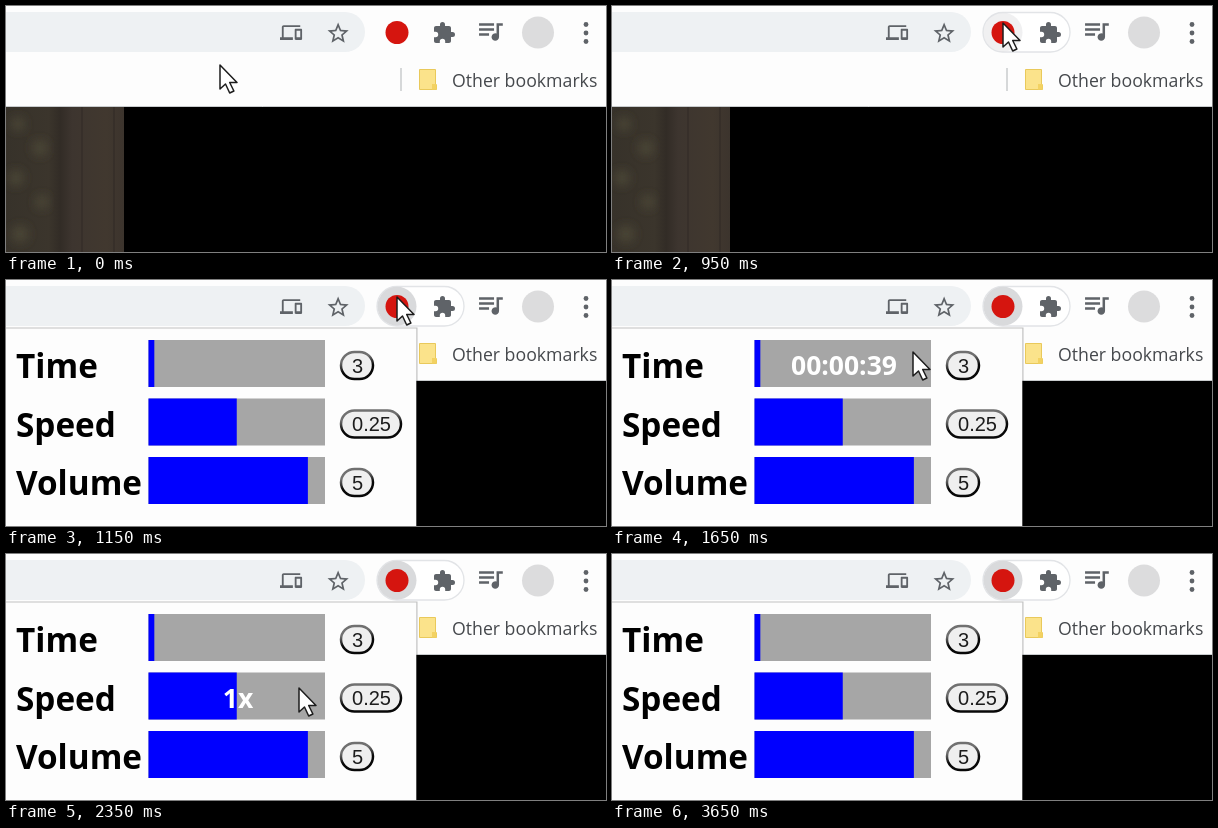
An HTML page for the animation above (3700 ms loop, 600 by 246 pixels).

```html
<!DOCTYPE html>
<html lang="en">
<head>
<meta charset="utf-8">
<title>Player controls popup</title>
<style>
  html, body { margin: 0; width: 100%; height: 100%; overflow: hidden; background: #fdfdfd; }
  svg { display: block; width: 600px; height: 246px; }
  .icon { fill: #5f6368; }
  .name { font: 700 33.3px "Open Sans", "Noto Sans", sans-serif; fill: #000; }
  .value { font: 700 26.5px "Open Sans", "Noto Sans", sans-serif; fill: #fff; text-anchor: middle; }
  .step { font: 20px "Liberation Sans", Arial, sans-serif; fill: #1c1c1c; text-anchor: middle; }
  .bookmark { font: 17.7px "Open Sans", "Noto Sans", sans-serif; fill: #46494d; }
</style>
</head>
<body>
<svg viewBox="0 0 600 246">
  <defs>
    <linearGradient id="bevel" x1="0" y1="0" x2=".3" y2="1">
      <stop offset=".35" stop-color="#707070"/><stop offset=".7" stop-color="#080808"/>
    </linearGradient>
    <linearGradient id="wall">
      <stop offset="0" stop-color="#37322a"/><stop offset=".36" stop-color="#3b352c"/>
      <stop offset=".46" stop-color="#322c26"/><stop offset=".56" stop-color="#3d352f"/>
      <stop offset=".85" stop-color="#41382f"/><stop offset="1" stop-color="#3c342d"/>
    </linearGradient>
    <filter id="soft"><feGaussianBlur stdDeviation="5"/></filter>
    <clipPath id="photo"><path d="M0 101h118v145H0z"/></clipPath>
  </defs>

  <path fill="#fdfdfd" d="M0 0h600v246H0z"/>
  <path fill="#eef1f3" d="M0 6h339a20 20 0 0 1 0 40H0z"/>

  <g id="pill" visibility="hidden">
    <rect x="371" y="6.5" width="87" height="39.5" rx="19.7" fill="#fff" stroke="#e2e4e7" stroke-width="1.3"/>
    <circle id="hover" cx="391" cy="26.3" r="19.5" fill="#d9dadc"/>
  </g>
  <circle cx="391" cy="26.5" r="11.5" fill="#d5150f"/>

  <g class="icon">
    <path transform="translate(274 15.5) scale(.92)" d="M4 6h18V4H4c-1.1 0-2 .9-2 2v11H0v3h14v-3H4V6zm19 2h-6c-.55 0-1 .45-1 1v10c0 .55.45 1 1 1h6c.55 0 1-.45 1-1V9c0-.55-.45-1-1-1zm-1 9h-4v-7h4v7z"/>
    <path transform="translate(319.400 14.500) scale(1.06)" d="M22 9.24l-7.19-.62L12 2 9.19 8.63 2 9.24l5.46 4.73L5.82 21 12 17.27 18.18 21l-1.63-7.03L22 9.24zM12 15.4l-3.76 2.27 1-4.28-3.32-2.88 4.38-.38L12 6.1l1.71 4.04 4.38.38-3.32 2.88 1 4.28L12 15.4z"/>
    <path transform="translate(426 15)" d="M20.5 11H19V7c0-1.1-.9-2-2-2h-4V3.5a2.5 2.5 0 0 0-5 0V5H4c-1.1 0-2 .9-2 2v3.8h1.5a2.7 2.7 0 0 1 0 5.4H2V20c0 1.1.9 2 2 2h3.8v-1.5a2.7 2.7 0 0 1 5.4 0V22H17c1.1 0 2-.9 2-2v-4h1.5a2.5 2.5 0 0 0 0-5z"/>
    <path transform="translate(469.3 9.8) scale(1.25)" d="M15 6H3v2h12V6zm0 4H3v2h12v-2zM3 16h8v-2H3v2zM17 6v8.18a3 3 0 1 0 2 2.82V8h3V6h-5z"/>
    <circle cx="580" cy="18.5" r="2.4"/><circle cx="580" cy="27" r="2.4"/><circle cx="580" cy="35.5" r="2.4"/>
  </g>
  <circle cx="532" cy="26.5" r="16" fill="#dcdcdd"/>

  <path stroke="#c9cbcd" stroke-width="1.5" d="M395 62v23"/>
  <path fill="#fbe38b" stroke="#e9c95b" d="M413.5 63.5h16V78l1 1v4.5h-17z"/>
  <path fill="#f3d262" d="M426 78h4.5v5.5H426z"/>
  <text class="bookmark" x="446" y="80.5">Other bookmarks</text>

  <path fill="#000" d="M0 101h600v145H0z"/>
  <g clip-path="url(#photo)">
    <path fill="url(#wall)" d="M0 101h118v145H0z"/>
    <g fill="#4a4436" filter="url(#soft)">
      <circle cx="12" cy="118" r="7"/><circle cx="34" cy="142" r="8"/><circle cx="10" cy="172" r="8"/>
      <circle cx="36" cy="196" r="7"/><circle cx="14" cy="228" r="9"/>
    </g>
    <path stroke="#332c27" stroke-width="2" opacity=".6" d="M76 101v145M108 101v145"/>
  </g>
  <path stroke="#c9ccce" d="M0 100.5h600"/>

  <g id="popup" opacity="0">
    <path fill="#000" opacity=".24" d="M0 47.500h411.500V246H0z"/>
    <path fill="#fdfdfd" d="M0 48.500h410.300V246.500H0z"/>
    <g id="rows"></g>
  </g>

  <path id="cursor" fill="#fff" stroke="#1c1c1c" stroke-width="1.5" stroke-linejoin="round"
        d="M0 0V24l5.5-5 4.2 9 4.2-2-4.2-8.5h7.3z"/>
</svg>
<script>
const LOOP = 3700, TICK = 50;
const BAR = { x: 142.5, w: 176.5, h: 47, top: 60, pitch: 58.5 };
const ROWS = [
  { name: 'Time', fill: 0.033, value: '00:00:39', mid: 232, step: '3', w: 32 },
  { name: 'Speed', fill: 0.5, value: '1x', mid: 232, step: '0.25', w: 60 },
  { name: 'Volume', fill: 0.903, value: '90%', mid: 228, step: '5', w: 32 }
];
// time, x, y of the pointer tip
const PATH = [
  [0, 214, 59], [50, 214, 59], [650, 391, 17], [1200, 391, 17],
  [1550, 301, 72], [1950, 301, 72], [2250, 293, 134], [2600, 293, 134],
  [2900, 297, 197], [3100, 297, 197], [3400, 300, 250], [LOOP, 300, 250]
];

const $ = id => document.getElementById(id);
const clamp = v => Math.min(1, Math.max(0, v));
const ease = p => p * p * (3 - 2 * p);

function add(tag, attrs, text) {
  const el = document.createElementNS('http://www.w3.org/2000/svg', tag);
  for (const key in attrs) el.setAttribute(key, attrs[key]);
  if (text) el.textContent = text;
  return $('rows').appendChild(el);
}

ROWS.forEach((row, i) => {
  const y = row.y = BAR.top + i * BAR.pitch;
  const { x, w, h } = BAR;
  add('text', { class: 'name', x: 10, y: y + 38 }, row.name);
  add('rect', { x, y, width: w, height: h, fill: '#a6a6a6' });
  add('rect', { x, y, width: w * row.fill, height: h, fill: '#00f' });
  row.label = add('text', { class: 'value', x: row.mid, y: y + 35.3 }, row.value);
  add('rect', { x: 335, y: y + 12, width: row.w, height: 27, rx: 13.5,
    fill: '#efefef', stroke: 'url(#bevel)', 'stroke-width': 2.5 });
  add('text', { class: 'step', x: 335.5 + row.w / 2, y: y + 32.7 }, row.step);
});

function pointer(t) {
  const i = PATH.findIndex(k => k[0] > t);
  const [t0, x0, y0] = PATH[i - 1], [t1, x1, y1] = PATH[i];
  const p = ease((t - t0) / (t1 - t0));
  return [x0 + (x1 - x0) * p, y0 + (y1 - y0) * p];
}

function show(el, on) { el.setAttribute('visibility', on ? 'visible' : 'hidden'); }

function draw(t) {
  const [x, y] = pointer(t);
  const open = clamp((t - 1000) / 100);
  $('cursor').setAttribute('transform', `translate(${x} ${y})`);
  $('popup').setAttribute('opacity', open);
  $('popup').setAttribute('transform', `translate(0 ${-4 * (1 - open)})`);
  show($('pill'), open > 0 || x > 371);
  $('hover').setAttribute('opacity', t < 1100 ? 0.4 : 1);
  for (const row of ROWS) {
    const inside = x >= BAR.x && x <= BAR.x + BAR.w && y >= row.y && y <= row.y + BAR.h;
    show(row.label, open === 1 && inside);
  }
}

const start = performance.now();
function frame() {
  const t = (performance.now() - start) % LOOP;
  draw(Math.floor(t / TICK) * TICK);
  requestAnimationFrame(frame);
}
draw(0);
requestAnimationFrame(frame);
</script>
</body>
</html>
```
